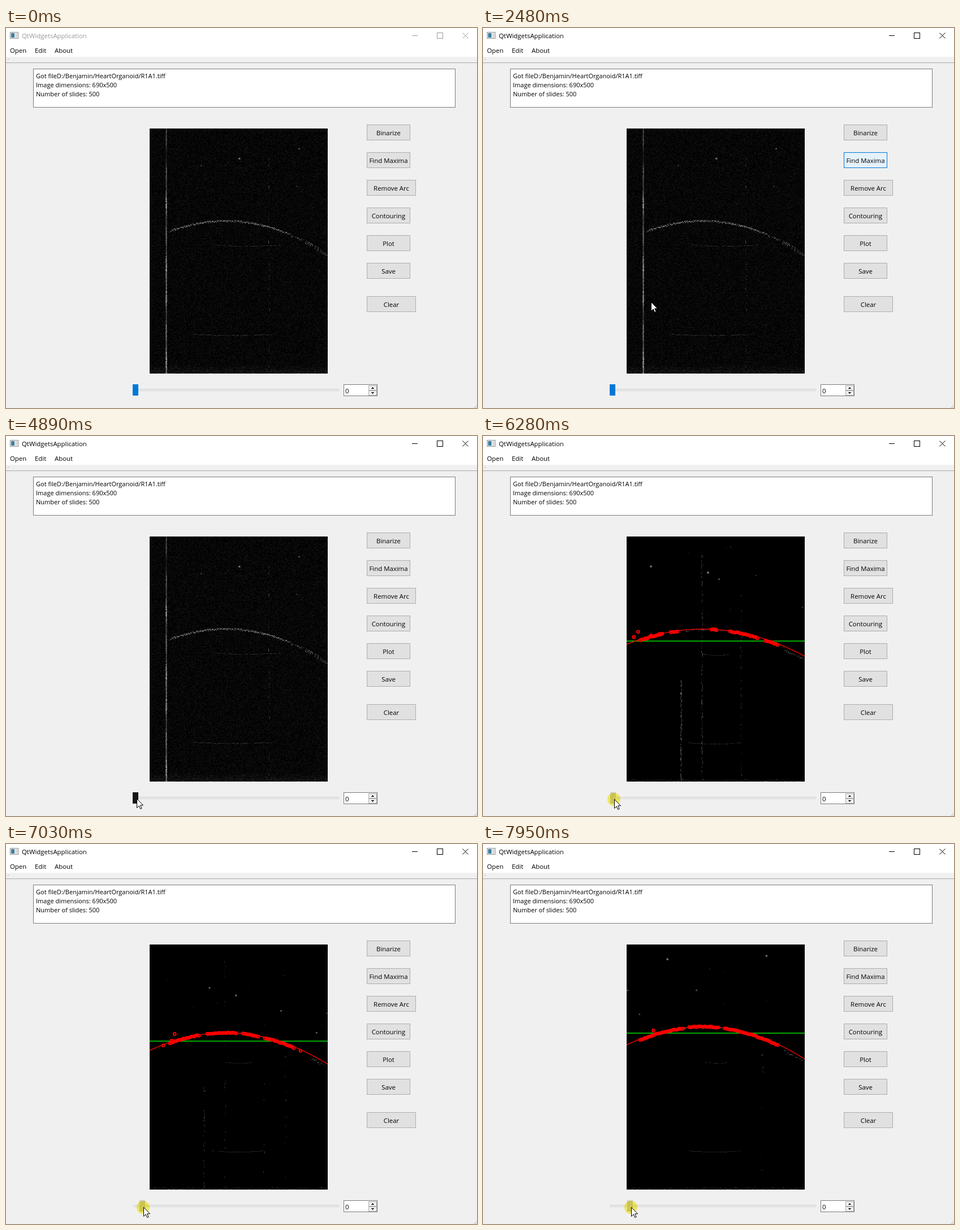
Recreate the animation shown at these times as an HTML page with a canvas. Size 833 by 673 pixels, loop 8 s.

```html
<!DOCTYPE html>
<html lang="en">
<head>
<meta charset="utf-8">
<title>QtWidgetsApplication</title>
<style>
html, body { margin: 0; width: 100%; height: 100%; overflow: hidden; background: #f0f0f0; }
canvas { display: block; }
</style>
</head>
<body>
<canvas id="stage" width="833" height="673"></canvas>
<script>
const LOOP = 8000, STEP = 70;
const ACTIVE = 1480, READY = 4540, PRESS = 5680, DRAG = 6280;
const VX = 254, VY = 178, VW = 315, VH = 434;
const g = document.getElementById('stage').getContext('2d');

const BUTTONS = ['Binarize', 'Find Maxima', 'Remove Arc', 'Contouring', 'Plot', 'Save', 'Clear'];
const LOG = [
  'Got fileD:/Benjamin/HeartOrganoid/R1A1.tiff',
  'Image dimensions: 690x500',
  'Number of slides: 500'
];

// Pointer strokes: start, end, goal x, goal y, sideways bow
const MOVES = [
  [120, 460, 753, 404, .5],
  [600, 1150, 671, 242, .15],
  [2010, 2680, 219, 548, .05],
  [2940, 3010, 213, 550, 0],
  [3610, 4010, 218, 638, .2],
  [4210, 4890, 231, 642, 0],
  [DRAG, DRAG, 232, 643, 0],
  [6540, 7310, 248, 643, 0],
  [7380, 7730, 260, 643, 0],
  [7950, 7950, 262, 643, 0]
];

function seeded(s) {
  return () => {
    s = (s + 0x6D2B79F5) | 0;
    let t = Math.imul(s ^ (s >>> 15), 1 | s);
    t = (t + Math.imul(t ^ (t >>> 7), 61 | t)) ^ t;
    return ((t ^ (t >>> 14)) >>> 0) / 4294967296;
  };
}

// Offscreen view, drawn in stage coordinates
function makeView() {
  const view = document.createElement('canvas');
  view.width = VW;
  view.height = VH;
  const c = view.getContext('2d');
  c.fillStyle = '#000';
  c.fillRect(0, 0, VW, VH);
  c.translate(-VX, -VY);
  return [view, c];
}

function speck(c, x, y, v, w = 1, h = 1) {
  c.fillStyle = `rgba(255,255,255,${v})`;
  c.fillRect(Math.round(x), Math.round(y), w, h);
}

function column(c, rnd, x, top, n) {
  for (let i = 0; i < n; i++)
    speck(c, x + (rnd() - .5) * 3, top + rnd() * (610 - top), .25 * rnd(), 1, 1 + rnd() * 4 | 0);
}

function row(c, rnd, y, x0, x1) {
  for (let x = x0; x < x1; x += 2)
    speck(c, x, y - 8 * ((x - x0) / (x1 - x0) - .5) ** 2, .22 * rnd(), 2);
}

function dots(c, rnd, n) {
  for (let i = 0; i < n; i++) {
    const r = .7 + 1.4 * rnd() ** 3;
    c.fillStyle = `rgba(200,200,200,${.3 * r})`;
    c.beginPath();
    c.arc(VX + rnd() * VW, 195 + rnd() * 140, r, 0, 7);
    c.fill();
  }
}

function rawView() {
  const [view, c] = makeView(), rnd = seeded(11);
  const data = c.getImageData(0, 0, VW, VH), px = data.data;
  for (let i = 0; i < VW * VH; i++) {
    const low = Math.max(0, (i / VW - 418) / 15);
    px.fill(26 * rnd() ** 3 + 50 * low * rnd() ** 4, i * 4, i * 4 + 3);
  }
  c.putImageData(data, 0, 0);

  for (let y = VY; y < VY + VH; y++) {
    const k = .36 + .22 * Math.sin(y / 13) * Math.sin(y / 29) + (y > 300 ? .08 : -.08);
    for (let x = 282; x < 285; x++)
      speck(c, x, y, k * (x === 283 ? .5 + rnd() * .8 : rnd()));
  }
  column(c, rnd, 465, 225, 60);
  row(c, rnd, 386, 368, 485);
  row(c, rnd, 544, 328, 480);

  for (let x = 289; x < 569; x++) {
    const y = 341 + .00188 * (x - 388) ** 2, far = x > 500;
    if (far && rnd() < .3) continue;
    const spread = far ? 6 : 3;
    for (let k = 0; k < 2; k++)
      speck(c, x, y + (rnd() - .5) * spread, .08 + .38 * rnd(), 1, 1 + rnd() * 2 | 0);
  }
  dots(c, rnd, 10);
  return view;
}

function ring(c, x, y) {
  c.beginPath();
  c.arc(x, y, 2.3, 0, 7);
  c.stroke();
}

function sliceView(i) {
  const [view, c] = makeView(), rnd = seeded(70 + i);
  const fade = Math.max(0, 1 - i / 10);
  const mid = 389, bend = Math.min(.00177, .00148 + .00003 * i);
  const arc = x => 342 - .97 * i + bend * (x - mid) ** 2;
  const line = 356.8 - 1.56 * (i - 3) + .0246 * (i - 3) * (i - 13);

  column(c, rnd, 350, 430, 200 * fade);
  column(c, rnd, 387, 205, 180 * fade);
  column(c, rnd, 456, 280, 60 * fade);
  column(c, rnd, 494, 345, 40 * (1 - Math.abs(i - 13) / 10));
  row(c, rnd, 545, 363, 455);
  row(c, rnd, 388, 390, 436);
  dots(c, rnd, 11);
  for (let x = VX; x < VX + VW; x += 3) {
    speck(c, x, 608 + rnd() * 4, .3 * rnd(), 2);
    if (x > 355 && (x < 450 || x > 530))
      speck(c, x, arc(x) + (x > 530 ? 6 : 0) + (rnd() - .5) * 4, .35 * rnd(), 2, 2);
  }

  c.fillStyle = '#0d0';
  c.fillRect(VX, line, VW, 1.5);
  c.strokeStyle = '#f00';
  c.lineWidth = 1.3;
  c.beginPath();
  for (let x = VX; x <= VX + VW; x += 3) c.lineTo(x, arc(x));
  c.stroke();

  // Maxima cluster along the arc; early slices leave its crown bare
  c.lineWidth = 2;
  for (let x = 278; x < 522; x += 3) {
    const side = Math.abs(x - mid);
    const gap = side < 48 ? 2.6 * fade - 1.3 : -1.3;
    if (Math.sin(x / 9 + i * 2.1) + Math.sin(x / 5.3 + i) > gap)
      ring(c, x, arc(x) + side / 65 + (rnd() - .5) * 1.6);
  }
  for (let k = 0; k < 1 + 3 * fade; k++) {
    const x = 265 + rnd() * 50;
    ring(c, x, arc(x) - 16 * rnd());
  }
  return view;
}

const raw = rawView();
const slices = Array.from({ length: 20 }, (_, i) => sliceView(i));

// Steps taken so far within a stroke, and in all
function steps(t, [t0, t1]) {
  const all = Math.round((t1 - t0) / STEP) + 1;
  const done = t1 === t0 ? 1 : Math.floor((t - t0) / (t1 - t0) * (all - 1) + 1e-6) + 1;
  return [Math.min(all, done), all];
}

function stateAt(t) {
  let x = 640, y = 662, slice = -1;
  for (const move of MOVES) {
    const [t0, , gx, gy, bow] = move;
    if (t < t0) break;
    const [done, all] = steps(t, move), u = done / all;
    const e = t0 < DRAG ? u * u * (3 - 2 * u) : u;
    const dx = gx - x, dy = gy - y, side = 2 * e * (1 - e) * bow;
    x += dx * e - dy * side;
    y += dy * e + dx * side;
    if (t0 >= DRAG) slice += done;
  }
  return { t, x: Math.round(x), y: Math.round(y), view: slices[slice] || raw };
}

function rect(x, y, w, h, fill, edge) {
  if (edge) {
    g.fillStyle = edge;
    g.fillRect(x, y, w, h);
    x++; y++; w -= 2; h -= 2;
  }
  g.fillStyle = fill;
  g.fillRect(x, y, w, h);
}

function label(str, x, y, { color = '#000', align = 'left', size = 11.4 } = {}) {
  g.font = `${size}px "Open Sans", "Noto Sans", sans-serif`;
  g.textAlign = align;
  g.fillStyle = color;
  g.fillText(str, x, y);
}

function drawWindow({ t }) {
  const ink = t < ACTIVE ? '#999' : '#000';
  rect(0, 0, 833, 673, '#f0f0f0');
  rect(0, 0, 833, 51, '#fff');
  rect(7, 7, 15, 12, '#f4f4f4', '#8a8f94');
  rect(9, 9, 6, 8, '#3f7f9f');
  rect(16, 9, 4, 8, '#d5d8da');
  label('QtWidgetsApplication', 28, 18, { color: ink });
  rect(718, 13, 10, 1, ink);
  rect(762, 8, 11, 11, '#fff', ink);
  g.strokeStyle = ink;
  g.lineWidth = 1;
  g.beginPath();
  g.moveTo(807.5, 8.5);
  g.lineTo(817.5, 18.5);
  g.moveTo(817.5, 8.5);
  g.lineTo(807.5, 18.5);
  g.stroke();

  label('Open', 7, 44);
  label('Edit', 51, 44);
  label('About', 86, 44);
  rect(3, 55, 2, 1, '#a0a0a0');
  rect(0, 61, 833, 1, '#a9a9a9');
  for (let r = 0; r < 3; r++)
    for (let k = 0; k <= r; k++) rect(831 - 2 * k, 668 + 2 * r, 1, 1, '#a8a8a8');

  rect(48, 72, 747, 69, '#fff', '#7a7a7a');
  LOG.forEach((s, i) => label(s, 53, 89 + i * 16, { size: 11 }));
}

function drawButtons({ t, x, y }) {
  BUTTONS.forEach((name, i) => {
    const top = 171 + 49 * i + (name === 'Clear' ? 10 : 0);
    const w = name === 'Clear' || name === 'Remove Arc' ? 87 : 77;
    const inside = x >= 638 && x < 638 + w && y >= top && y < top + 28;
    const hot = t < ACTIVE ? inside : t < READY && i === 1;
    rect(638, top, w, 28, hot ? '#e5f1fb' : '#e1e1e1', hot ? '#0078d7' : '#adadad');
    label(name, 638 + w / 2, top + 19, { align: 'center' });
  });
}

function drawSlider({ t, x }) {
  rect(225, 639, 364, 4, '#e7eaea', '#d6d6d6');
  const left = 224 + (t < PRESS ? 0 : x - 231);
  rect(left, 631, 10, 20, t < READY ? '#0078d7' : t < PRESS ? '#171717' : '#ccc');

  rect(597, 631, 60, 21, '#fff', '#7a7a7a');
  label('0', 600, 647);
  for (const [top, d] of [[633, -1], [642, 1]]) {
    rect(641, top, 15, 9, '#f0f0f0', '#adadad');
    for (let k = 0; k < 3; k++)
      rect(646 + k, top + 4 + d * (k - 1), 5 - 2 * k, 1, '#222');
  }
}

function drawPointer({ t, x, y }) {
  if (t < MOVES[0][0]) return;
  if ((t >= ACTIVE && t < 1610) || t >= PRESS) {
    g.globalCompositeOperation = 'multiply';
    g.fillStyle = 'rgb(253,245,105)';
    g.beginPath();
    g.arc(x - .5, y + .5, 11.5, 0, 7);
    g.fill();
    g.globalCompositeOperation = 'source-over';
  }
  const shape = [[0, 0], [0, 16], [3.7, 12.4], [6.2, 18], [8.6, 17], [6.2, 11.4], [11, 11.4]];
  g.beginPath();
  shape.forEach(([dx, dy]) => g.lineTo(x + dx + .5, y + dy + .5));
  g.closePath();
  g.fillStyle = '#fff';
  g.fill();
  g.strokeStyle = '#000';
  g.lineWidth = 1;
  g.stroke();
}

function draw(now) {
  const state = stateAt(now % LOOP);
  drawWindow(state);
  g.drawImage(state.view, VX, VY);
  drawButtons(state);
  drawSlider(state);
  drawPointer(state);
}

const start = performance.now();
function tick() {
  draw(performance.now() - start);
  requestAnimationFrame(tick);
}
tick();
</script>
</body>
</html>
```
